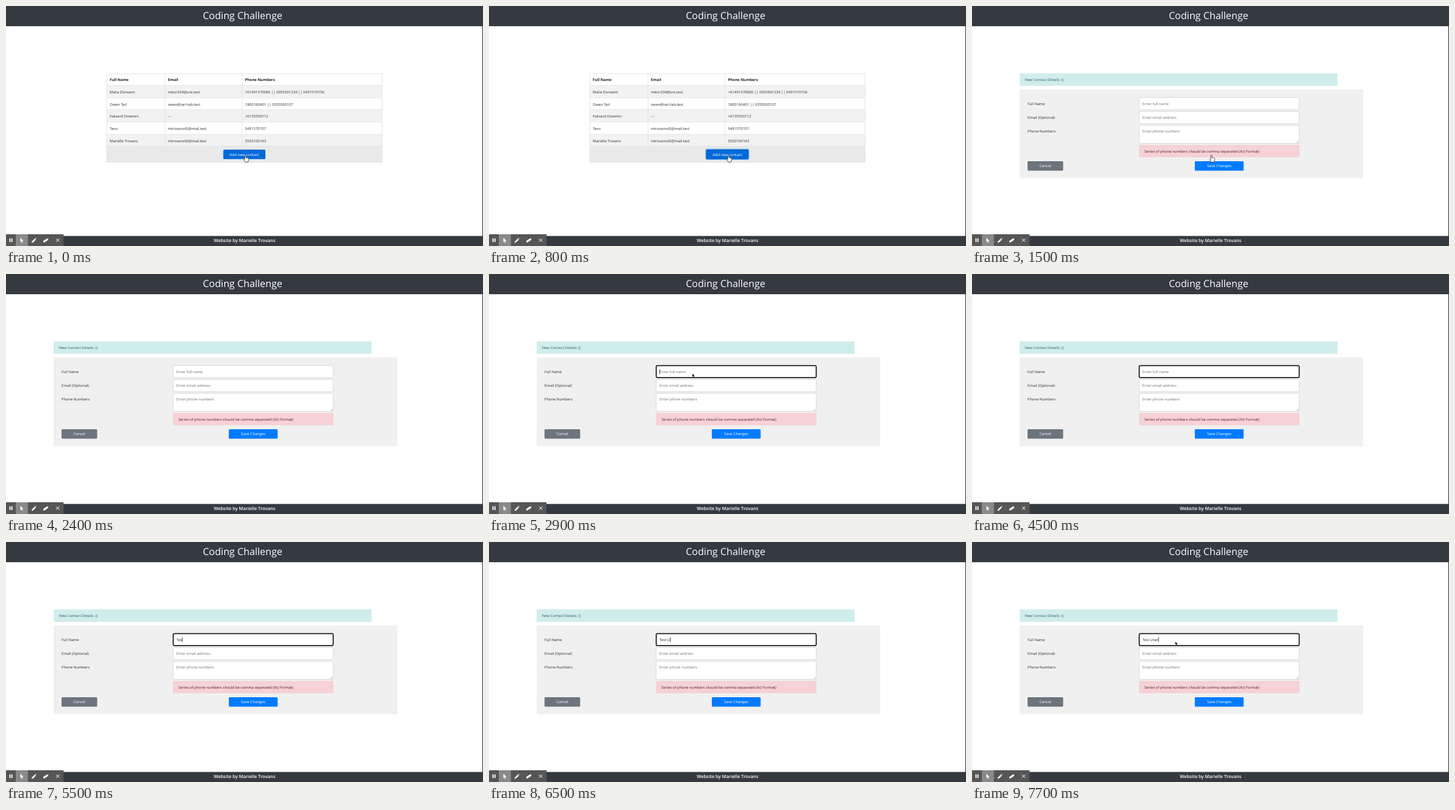
An HTML page with a canvas for the animation above (8 s loop, 730 by 368 pixels).

```html
<!DOCTYPE html>
<html lang="en">
<head>
<meta charset="utf-8">
<title>Coding Challenge</title>
<style>
html, body { margin: 0; width: 100%; height: 100%; overflow: hidden; background: #fff; }
canvas { display: block; width: 730px; height: 368px; }
</style>
</head>
<body>
<canvas id="stage"></canvas>
<script>
const W = 730, H = 368, LOOP = 8000;
const canvas = document.getElementById('stage');
const ctx = canvas.getContext('2d');
const dpr = window.devicePixelRatio || 1;
canvas.width = W * dpr;
canvas.height = H * dpr;

const FONT = '"Open Sans", "Noto Sans", sans-serif';
const DARK = '#343a40', INK = '#2b2f33', LINE = '#dee2e6', HINT = '#6c757d';

const rows = [
  ['Malia Dorwent', 'mdor204@uni.test', '+61491570006 || 0355501234 || 0491570156'],
  ['Owen Tarl', 'owen@tarl-lab.test', '1800160401 || 0355500107'],
  ['Halvard Ostemin', '---', '+6135550112'],
  ['Tevo', 'mtrovans42@mail.test', '0491570157'],
  ['Marielle Trovans', 'mtrovans42@mail.test', '5550100143']
];

const typed = 'Test User';
const keyTimes = [5000, 5200, 5500, 5900, 6500, 6500, 6600, 7200, 7600];

function rect(x, y, w, h, color) {
  ctx.fillStyle = color;
  ctx.fillRect(x, y, w, h);
}

function box(x, y, w, h, r, fill, stroke, lw = 1) {
  ctx.beginPath();
  ctx.roundRect(x, y, w, h, r);
  if (fill) { ctx.fillStyle = fill; ctx.fill(); }
  if (stroke) { ctx.strokeStyle = stroke; ctx.lineWidth = lw; ctx.stroke(); }
}

// y is the vertical middle of the capitals
function text(s, x, y, { size = 5.65, weight = 400, color = INK, align = 'left' } = {}) {
  ctx.font = `${weight} ${size}px ${FONT}`;
  ctx.textAlign = align;
  ctx.fillStyle = color;
  ctx.fillText(s, x, y + size * 0.36);
}

function poly(points, fill, stroke, lw = 1) {
  ctx.beginPath();
  points.forEach(([x, y], i) => i ? ctx.lineTo(x, y) : ctx.moveTo(x, y));
  ctx.closePath();
  if (fill) { ctx.fillStyle = fill; ctx.fill(); }
  if (stroke) { ctx.strokeStyle = stroke; ctx.lineWidth = lw; ctx.stroke(); }
}

function button(label, x, y, w, color) {
  box(x, y, w, 14.5, 1.5, color);
  text(label, x + w / 2, y + 7.3, { size: 5.8, color: '#fff', align: 'center' });
}

function hand(x, y) {
  ctx.save();
  ctx.translate(x, y);
  ctx.beginPath();
  ctx.moveTo(2, 6.5);
  ctx.lineTo(2, 1);
  ctx.quadraticCurveTo(2.8, -0.2, 3.6, 1);
  ctx.lineTo(3.6, 4);
  ctx.lineTo(7, 5);
  ctx.quadraticCurveTo(8, 5.4, 7.8, 7);
  ctx.lineTo(6.8, 11.3);
  ctx.lineTo(2.8, 11.3);
  ctx.lineTo(0.3, 7.4);
  ctx.quadraticCurveTo(0.4, 5.6, 2, 6.8);
  ctx.closePath();
  ctx.lineJoin = 'round';
  ctx.fillStyle = '#fff';
  ctx.fill();
  ctx.strokeStyle = '#333';
  ctx.lineWidth = 0.8;
  ctx.stroke();
  ctx.restore();
}

function pointer(x, y) {
  poly([[x, y], [x, y + 4.4], [x + 1.1, y + 3.6], [x + 1.9, y + 5.2],
        [x + 2.7, y + 4.8], [x + 2, y + 3.3], [x + 3.2, y + 3]], '#000');
}

function toolbar() {
  rect(0, 350, 88, 18, '#565656');
  rect(15, 350, 18.5, 18, '#8a8a8a');
  rect(5.3, 356.3, 1.7, 5.6, '#fff');
  rect(8.3, 356.3, 1.7, 5.6, '#fff');
  poly([[22, 355.6], [22, 362.2], [23.6, 360.8], [24.7, 363.2],
        [25.8, 362.7], [24.7, 360.4], [26.8, 360.2]], '#fff');
  poly([[39.3, 363], [39.5, 361.2], [43.9, 356.8], [45.5, 358.4], [41.1, 362.8]], '#fff');
  poly([[44.4, 356.3], [45.2, 355.6], [46.6, 357], [45.9, 357.8]], '#fff');
  poly([[57, 360.2], [62.6, 356.4], [64.8, 356.4], [64.2, 358.9], [58.8, 362.6], [57, 362.6]], '#fff');
  ctx.strokeStyle = '#fff';
  ctx.lineWidth = 1;
  ctx.beginPath();
  ctx.moveTo(76.7, 356.6); ctx.lineTo(81.7, 361.6);
  ctx.moveTo(81.7, 356.6); ctx.lineTo(76.7, 361.6);
  ctx.stroke();
}

function page() {
  rect(0, 0, W, H, '#fff');
  rect(0, 0, W, 31, DARK);
  text('Coding Challenge', 362, 14.8, { size: 15, weight: 500, color: '#fff', align: 'center' });
  rect(0, 352.6, W, 15.4, DARK);
  text('Website by Marielle Trovans', 365, 359.3, { size: 7, weight: 600, color: '#fff', align: 'center' });
  rect(729, 0, 1, H, DARK);
  toolbar();
}

function table(t) {
  const top = 103.5, rowH = 18.6, cols = [154, 243, 361];
  const rowY = i => Math.round(top + i * rowH);
  for (let i = 1; i <= 5; i += 2) rect(154, rowY(i), 421.5, rowH, '#f2f2f2');
  rect(154, 215, 421.5, 25, '#e9e9e9');
  for (let i = 0; i <= 6; i++) rect(154, rowY(i) - 0.5, 421.5, 0.8, LINE);
  rect(154, 239.2, 421.5, 0.8, LINE);
  for (const x of cols) rect(x - 0.2, top, 0.8, x === 154 ? 136 : 112, LINE);
  rect(575, top, 0.8, 136, LINE);
  ['Full Name', 'Email', 'Phone Numbers'].forEach((s, i) =>
    text(s, cols[i] + 4.8, 113, { size: 5.7, weight: 700, color: '#1c2024' }));
  rows.forEach((row, r) => row.forEach((s, i) =>
    text(s, cols[i] + 4.8, 132 + r * 18.65)));

  const glow = Math.min(1, Math.max(0, (t - 500) / 300));
  if (glow) box(331.9, 219.6, 65.7, 15.7, 2, null, `rgba(38,143,255,${0.55 * glow})`, 1.6);
  button('Add new contact', 332.5, 220.2, 64.5, '#0069d9');
  if (glow) box(332.8, 220.5, 63.9, 13.9, 1.5, null, `rgba(0,86,184,${glow})`, 0.7);
}

function caretOn(t) {
  return (t >= 2900 && t < 3500) || (t >= 4000 && t < 4500) || t >= 4900;
}

function form(t) {
  box(73, 103.2, 486.5, 19.3, 1, '#d0eded');
  text('New Contact Details: ()', 81, 113, { color: '#2c5b62' });
  rect(73, 128, 525.5, 136, '#f0f0f0');

  const fields = [
    ['Full Name', 'Enter full name', 140.3, 18.7],
    ['Email (Optional)', 'Enter email address', 161.6, 18.7],
    ['Phone Numbers', 'Enter phone numbers', 182.9, 27.8]
  ];
  const count = keyTimes.filter(k => t >= k).length;
  const value = typed.slice(0, count);
  fields.forEach(([label, hint, y, h], i) => {
    text(label, 85, y + 9.2);
    box(255.8, y, 245, h, 1.5, '#fff', '#ced4da', 0.8);
    const filled = i === 0 && count > 0;
    text(filled ? value : hint, 260.8, y + 9.5, { color: filled ? '#25292d' : HINT });
  });

  ctx.strokeStyle = '#888';
  ctx.lineWidth = 0.5;
  ctx.beginPath();
  ctx.moveTo(496.8, 209.8); ctx.lineTo(499.8, 206.8);
  ctx.moveTo(498.4, 209.8); ctx.lineTo(499.8, 208.4);
  ctx.stroke();

  if (t >= 2800) {
    box(255.9, 140.4, 244.8, 18.4, 1.5, null, '#101010', 1.5);
    if (caretOn(t)) {
      ctx.font = `400 5.65px ${FONT}`;
      rect(260.8 + ctx.measureText(value).width, 146, 0.7, 7.4, '#111');
    }
  }

  box(255.5, 213, 245.7, 19, 1.2, '#f6d1d5');
  text('Series of phone numbers should be comma separated (AU Format)', 264, 222.8, { color: '#4f2228' });
  button('Cancel', 85, 238, 54.5, '#6c757d');
  button('Save Changes', 341, 238, 74.7, '#007bff');
}

function draw(t) {
  ctx.setTransform(dpr, 0, 0, dpr, 0, 0);
  ctx.textRendering = 'geometricPrecision';
  ctx.textBaseline = 'alphabetic';
  page();
  if (t < 1500) table(t); else form(t);
  if (t < 2200) hand(363.6, 228.2);
  if ((t >= 2800 && t < 3200) || t >= 7700) pointer(311.3, 153);
}

function tick(now) {
  draw(now % LOOP);
  requestAnimationFrame(tick);
}
requestAnimationFrame(tick);
</script>
</body>
</html>
```
